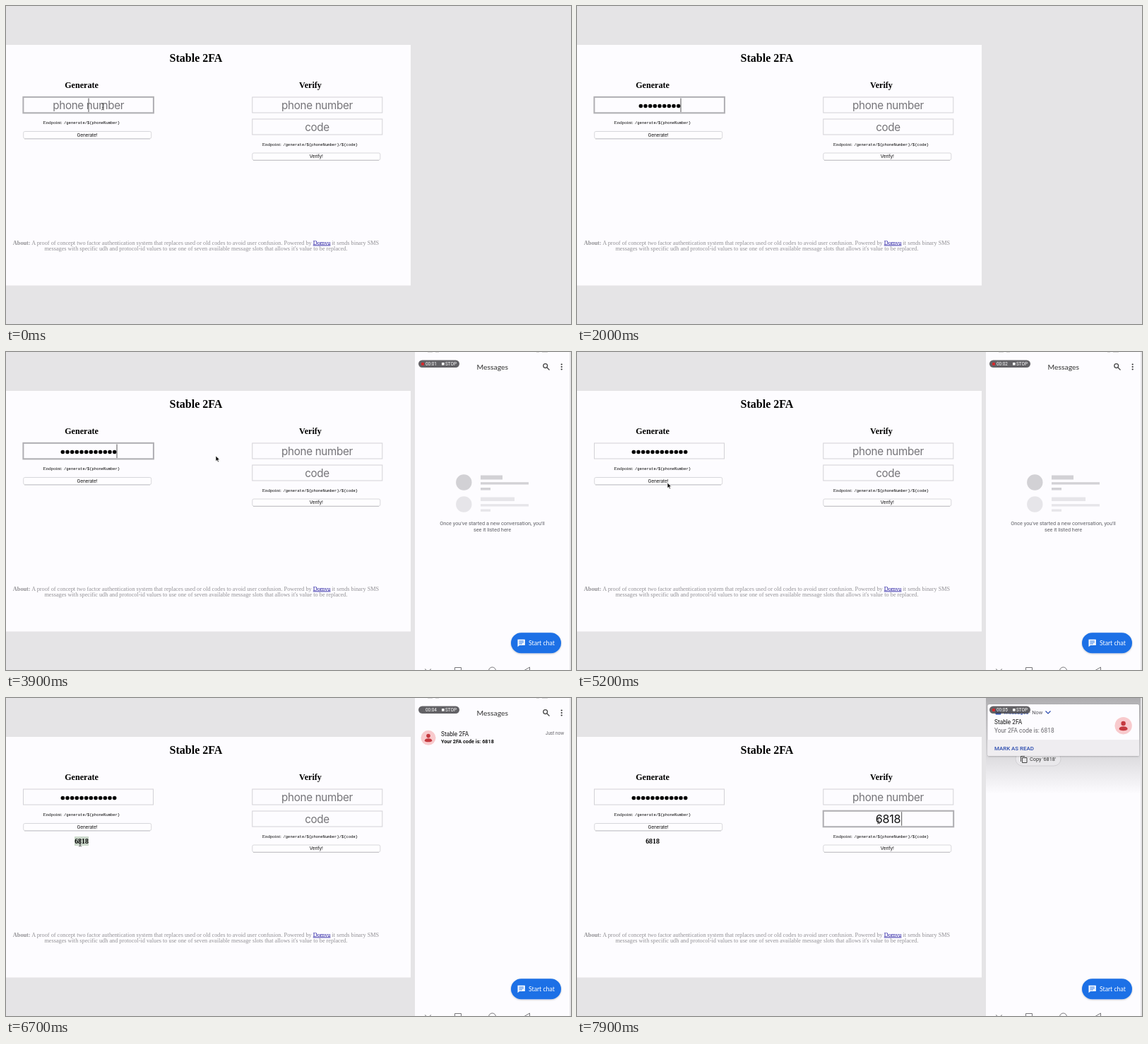
An HTML page for the animation above (8 s loop, 800 by 450 pixels).

```html
<!DOCTYPE html>
<html lang="en">
<head>
<meta charset="utf-8">
<title>Two factor demo</title>
<style>
  html, body { margin: 0; width: 100%; height: 100%; overflow: hidden; background: #e5e4e6; }
  svg { display: block; width: 100vw; height: 100vh; }
  .serif { font-family: "Liberation Serif", serif; }
  .sans { font-family: Inter, sans-serif; letter-spacing: -.02em; }
  .mono { font: 5.5px "Liberation Mono", monospace; fill: #000; }
  .phone { font-family: Roboto, sans-serif; }
  .brand { font-family: Lato, sans-serif; }
  .mid { text-anchor: middle; }
  .bold { font-weight: 700; }
  .field { fill: #fdfcff; stroke: #d3d2d6; }
  .hint { font-size: 15.2px; fill: #757478; }
  .button { fill: #fefdff; stroke: #cfced2; stroke-width: .8; }
  .label { font-size: 6.5px; fill: #111; }
  .ring { fill: none; stroke: #b0afb3; stroke-width: 2; }
  .caret { stroke: #555; stroke-width: 1; }
  .line { fill: none; stroke: #444; }
</style>
</head>
<body>
<svg viewBox="0 0 800 450">
  <defs>
    <linearGradient id="shade" x1="0" y1="0" x2="0" y2="1">
      <stop offset="0" stop-color="#adacaf"/>
      <stop offset=".08" stop-color="#b8b7ba"/>
      <stop offset=".6" stop-color="#dcdbde"/>
      <stop offset="1" stop-color="#dcdbde" stop-opacity="0"/>
    </linearGradient>
    <filter id="soft" x="-20%" y="-20%" width="140%" height="160%">
      <feDropShadow dx="0" dy=".8" stdDeviation="1" flood-opacity=".25"/>
    </filter>
    <clipPath id="screen"><rect x="579" width="219" height="450"/></clipPath>
    <g id="person">
      <circle r="10.5" fill="#f8cacd"/>
      <circle cy="-2.7" r="2.8" fill="#c5393f"/>
      <path d="M-5.2 4Q-5 .9 0 .9T5.2 4Q5 6 0 6T-5.2 4Z" fill="#c5393f"/>
    </g>
  </defs>
  <rect width="800" height="450" fill="#e5e4e6"/>

  <g id="page">
    <rect y="55" width="573" height="340.5" fill="#fdfcff"/>
    <g class="serif mid bold">
      <text x="269" y="79" font-size="16">Stable 2FA</text>
      <text x="107" y="115.7" font-size="12.1">Generate</text>
      <text x="431" y="115.7" font-size="12.1">Verify</text>
    </g>
    <rect class="field" x="24.5" y="129" width="184" height="22"/>
    <rect class="field" x="348.8" y="129" width="184" height="22"/>
    <rect class="field" x="348.8" y="160" width="184" height="22"/>
    <g class="sans mid hint">
      <text id="hintLeft" x="116.7" y="146.3">phone number</text>
      <text x="440.5" y="146.3">phone number</text>
      <text id="hintCode" x="440.5" y="177.2">code</text>
    </g>
    <text id="pasted" class="sans mid" x="440.5" y="177.2" font-size="16.2" fill="#111">6818</text>
    <g class="serif" font-size="6.9" fill="#111">
      <text x="52.6" y="167">Endpoint:</text>
      <text x="362.8" y="198">Endpoint:</text>
    </g>
    <text class="mono" x="82" y="166.8">/generate/${phoneNumber}</text>
    <text class="mono" x="392.5" y="197.8">/generate/${phoneNumber}/${code}</text>
    <path d="M26 188H204M350 218.5H528" stroke="#b4b3b7" stroke-width=".8"/>
    <rect id="generate" class="button" x="24.7" y="177.5" width="181" height="10" rx="2"/>
    <rect class="button" x="348.8" y="208" width="181" height="10" rx="2"/>
    <g class="sans mid label">
      <text x="115" y="184.8">Generate!</text>
      <text x="439.3" y="215.2">Verify!</text>
    </g>
    <g class="serif mid" font-size="8.24" fill="#929195">
      <text x="269" y="337.5"><tspan class="bold">About:</tspan> A proof of concept two factor authentication system that replaces used or old codes to avoid user confusion. Powered by <tspan fill="#1a109c" text-decoration="underline">Domvu</tspan> it sends binary SMS</text>
      <text x="269" y="346.3">messages with specific udh and protocol-id values to use one of seven available message slots that allows it's value to be replaced.</text>
    </g>
    <rect id="selection" x="97" y="196" width="20" height="13" fill="#cbd8cb"/>
    <text id="code" class="serif mid bold" x="107" y="206" font-size="9.8">6818</text>
    <rect id="ringLeft" class="ring" x="24.4" y="128.8" width="184.5" height="22.6"/>
    <rect id="ringCode" class="ring" x="348.7" y="159.7" width="184.5" height="22.6"/>
    <g id="dots"></g>
    <path id="caret" class="caret" d="M0 -10V9.5"/>
    <path id="arrow" d="M0 0V7.6L1.8 6L3.1 8.8L4.4 8.2L3.2 5.5H5.6Z" fill="#111" stroke="#fff" stroke-width=".6"/>
    <path id="beam" class="line" stroke-width=".8" d="M-2 -4.5Q0 -4.5 0 -3Q0 -4.5 2 -4.5M0 -3V3.5M-2 5Q0 5 0 3.5Q0 5 2 5M-1.2 1.5H1.2"/>
  </g>

  <g id="device" clip-path="url(#screen)">
    <rect x="579" width="219" height="450" fill="#fdfcff"/>
    <path d="M597 0H604M608 0H613M751 0H755M759 0H767" stroke="#bbb" stroke-width="1"/>
    <text class="brand" x="666.5" y="24.7" font-size="10.4" fill="#333">Messages</text>
    <path class="line" stroke-width="1.3" d="M766 22L769.5 25.5"/>
    <circle class="line" cx="763.7" cy="19.6" r="2.9" stroke-width="1.3"/>
    <g fill="#333"><circle cx="786.7" cy="17.5" r="1.1"/><circle cx="786.7" cy="21" r="1.1"/><circle cx="786.7" cy="24.5" r="1.1"/></g>

    <g id="empty">
      <g fill="#d2d1d5">
        <circle cx="648.3" cy="184.5" r="11.2"/>
        <path d="M672 174.5h31v6h-31zM672 184.2h68v3.4h-68zM672 192h14v3.4h-14z"/>
      </g>
      <g fill="#e6e5e9">
        <circle cx="648.3" cy="215.5" r="11.2"/>
        <path d="M672 205.5h48v5.5h-48zM672 215.3h68v3.2h-68zM672 222.6h14v3.2h-14z"/>
      </g>
      <g class="phone mid" font-size="7.33" fill="#5f6066">
        <text x="688.5" y="245">Once you've started a new conversation, you'll</text>
        <text x="688.5" y="253.6">see it listed here</text>
      </g>
    </g>

    <g id="row" class="phone" fill="#111">
      <use href="#person" x="598" y="56.3"/>
      <text x="616" y="54" font-size="8.3">Stable 2FA</text>
      <text class="bold" x="616" y="64.3" font-size="7.25">Your 2FA code is: 6818</text>
      <text x="764" y="52" font-size="6.4" fill="#66656a">Just now</text>
    </g>

    <rect x="715" y="397.3" width="71" height="29" rx="14.5" fill="#1a6fe6" filter="url(#soft)"/>
    <path d="M724.5 406.8H734.8V415H727L724.5 417.3Z" fill="#fff"/>
    <path d="M726.3 409H733M726.3 411H733M726.3 413H731" stroke="#1a6fe6" stroke-width=".9"/>
    <text class="brand" x="740" y="415" font-size="8.7" fill="#fff">Start chat</text>
    <g fill="none" stroke="#77767a" stroke-width="1">
      <path d="M593 448.5L597.5 452L602 448.5M635.5 452V446.5H644.5V452M741.5 452V446L733 451"/>
      <circle cx="688.5" cy="451" r="5"/>
    </g>

    <g id="notice">
      <rect x="579" width="219" height="136" fill="url(#shade)"/>
      <rect x="621" y="76.5" width="64" height="19.5" rx="9.7" fill="#e9e8eb" stroke="#cccbcf" stroke-width=".8"/>
      <path class="line" d="M628.5 90V82.5H634M630.5 84.5H637V91.5H630.5Z"/>
      <text class="phone" x="641" y="89" font-size="7.3" fill="#333">Copy '6818'</text>
      <rect x="581.5" y="9" width="214.5" height="73" rx="2.5" fill="#fdfcff" filter="url(#soft)"/>
      <path d="M581.5 59H796V80Q796 82 793.5 82H584Q581.5 82 581.5 80Z" fill="#efedf0"/>
      <rect x="592.5" y="16.5" width="8" height="7" rx="1" fill="#2c52b8"/>
      <g class="phone">
        <text x="604.5" y="22.8" font-size="7.6" fill="#2a4aae">Messages</text>
        <text x="640.5" y="22.8" font-size="7.4" fill="#55545a">· Now</text>
        <text x="591" y="37" font-size="8.3" fill="#111">Stable 2FA</text>
        <text x="591" y="48.8" font-size="8.35" fill="#66656a">Your 2FA code is: 6818</text>
        <text x="591" y="73.5" font-size="7.9" font-weight="500" fill="#2a4aae">MARK AS READ</text>
      </g>
      <path d="M663.5 18.5L667 22L670.5 18.5" fill="none" stroke="#2a4aae" stroke-width="1.2"/>
      <use href="#person" transform="translate(773.6 39.2) scale(1.16)"/>
    </g>

    <rect x="584" y="11.5" width="58" height="10.5" rx="5.2" fill="#4e4d51" opacity=".88"/>
    <circle id="record" cx="590" cy="16.9" r="2.2" fill="#d8272c"/>
    <text id="clock" class="phone" x="594" y="19.2" font-size="6.4" fill="#fff"></text>
    <rect x="617" y="15" width="3.6" height="3.6" fill="#fff"/>
    <text class="phone" x="622" y="19.2" font-size="6.4" fill="#fff">STOP</text>
  </g>
</svg>
<script>
const LOOP = 8000, STEP = 100, DOT = 6.67, CENTER = 117;
const keyTimes = [700, 800, 1100, 1200, 1400, 1500, 1600, 1900, 2000, 2300, 2600, 2700];
const at = { phone: 2300, blur: 4400, press: 5000, release: 5200, code: 5700, message: 6200,
             select: 6500, focusCode: 7300, notice: 7000, paste: 7700 };

// time, x, y, shape shown from that time on
const pointerPath = [
  [0, 137, 142, "beam"], [100, 137, 142, ""], [3600, 200, 144, "arrow"],
  [3900, 297, 147, "arrow"], [4100, 297, 147, "arrow"], [4500, 128, 185, "arrow"],
  [5900, 128, 185, "arrow"], [6200, 105, 205, "beam"], [6800, 105, 205, "arrow"],
  [7200, 427, 173, "beam"], [LOOP, 427, 173, "beam"]
];

const $ = id => document.getElementById(id);
const show = (id, on) => $(id).setAttribute("opacity", Number(on));
const move = (id, x, y) => $(id).setAttribute("transform", `translate(${x} ${y})`);
const ease = p => p * p * (3 - 2 * p);
const clamp = p => Math.max(0, Math.min(1, p));

const dots = keyTimes.map(() => {
  const dot = document.createElementNS("http://www.w3.org/2000/svg", "circle");
  dot.setAttribute("r", 2.75);
  dot.setAttribute("cy", 141.5);
  return $("dots").appendChild(dot);
});

function drawPointer(t) {
  const i = pointerPath.findLastIndex(k => k[0] <= t);
  const [t0, x0, y0, shape] = pointerPath[i];
  const [t1, x1, y1] = pointerPath[i + 1];
  const p = ease((t - t0) / (t1 - t0));
  for (const id of ["arrow", "beam"]) {
    show(id, id === shape);
    move(id, x0 + (x1 - x0) * p, y0 + (y1 - y0) * p);
  }
}

function drawCaret(t, count) {
  const blink = since => (t - since) % 1000 < 500;
  let x = CENTER, y = 140.5, alpha = 0;
  if (!count) alpha = clamp(1 - t / 300);
  else if (t < at.blur) {
    x += count * DOT / 2;
    alpha = blink(keyTimes[count - 1]);
  } else if (t >= at.focusCode) {
    const pasted = t >= at.paste;
    x = pasted ? 459.7 : 440.5;
    y = 171.2;
    alpha = blink(pasted ? at.paste : at.focusCode);
  }
  move("caret", x, y);
  show("caret", alpha);
}

function draw(t) {
  const count = keyTimes.filter(k => k <= t).length;
  dots.forEach((dot, i) => {
    dot.setAttribute("cx", CENTER + (i - (count - 1) / 2) * DOT);
    dot.setAttribute("opacity", Number(i < count));
  });
  show("hintLeft", !count);
  show("ringLeft", t < at.blur);
  show("ringCode", t >= at.focusCode);
  show("hintCode", t < at.paste);
  show("pasted", t >= at.paste);
  show("code", t >= at.code);
  show("selection", t >= at.select && t < at.focusCode);
  $("generate").style.fill = t >= at.press && t < at.release ? "#e9e8ec" : "";

  show("device", t >= at.phone);
  show("empty", t < at.message);
  show("row", t >= at.message);
  show("notice", t >= at.notice);
  move("notice", 0, -136 * (1 - ease(clamp((t - at.notice) / 300))));
  show("record", (t + 200) % 1000 < 500);
  $("clock").textContent = "00:0" + Math.max(0, Math.floor((t - at.phone) / 1000));

  drawCaret(t, count);
  drawPointer(t);
}

const start = performance.now();
function frame() {
  const t = (performance.now() - start) % LOOP;
  draw(Math.floor(t / STEP) * STEP);
  requestAnimationFrame(frame);
}
frame();
</script>
</body>
</html>
```
